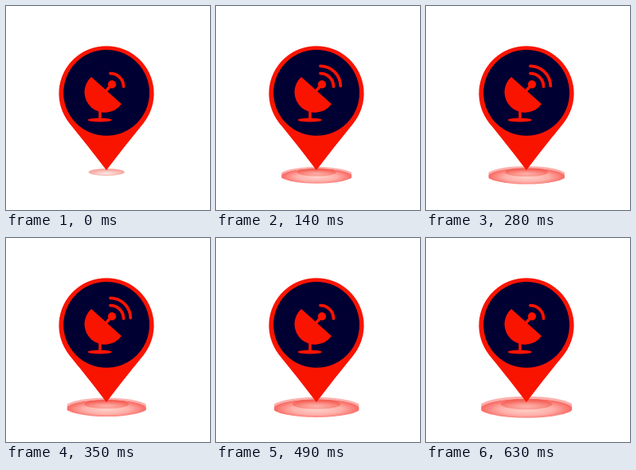
Animation, 256 px wide and 256 px high, one loop 700 ms. Source, as an HTML page:

```html
<!DOCTYPE html>
<html lang="en">
<head>
<meta charset="utf-8">
<title>Signal pin</title>
<style>
  html, body { margin: 0; width: 100%; height: 100%; overflow: hidden; background: #fff; }
  svg { display: block; width: 100vw; height: 100vh; }
</style>
</head>
<body>
<svg viewBox="0 0 256 256">
  <defs>
    <radialGradient id="outerFill" cy=".6">
      <stop offset="0" stop-color="#ffd2cc"/>
      <stop offset=".55" stop-color="#ffb0aa"/>
      <stop offset=".95" stop-color="#f96a64"/>
      <stop offset="1" stop-color="#fbb0ac"/>
    </radialGradient>
    <radialGradient id="innerFill" cy=".65">
      <stop offset="0" stop-color="#f04838" stop-opacity=".12"/>
      <stop offset="1" stop-color="#f04838" stop-opacity=".48"/>
    </radialGradient>
    <clipPath id="sides"><path d="M-1-1H1V1H-1z"/></clipPath>
  </defs>
  <g id="outer"><ellipse rx="1.05" ry=".237" fill="url(#outerFill)" clip-path="url(#sides)"/></g>
  <g id="inner"><ellipse rx="1" ry=".203" fill="url(#innerFill)"/></g>
  <g fill="#f91400">
    <path d="M126 206Q103.3 176 79.2 146.7A59.6 59.6 0 1 1 172.8 146.7Q148.7 176 126 206Z"/>
    <circle cx="126.1" cy="108.9" r="53.9" fill="#000032"/>
    <path d="M107 89A25.65 25.65 0 1 0 145 123Z"/>
    <circle cx="133" cy="98.3" r="5.1"/>
    <path d="M116.2 130h3.6v12h-3.6z"/>
    <ellipse cx="117.7" cy="143.1" rx="15" ry="2.5"/>
  </g>
  <g fill="none" stroke="#f91400" stroke-width="3.8" stroke-linecap="round">
    <path d="M125 107L133 98.3"/>
    <path d="M131 84.6A16.5 16.5 0 0 1 147.5 101"/>
    <path id="wave" d="M131 75.3A25.5 25.5 0 0 1 156.3 100.3"/>
  </g>
</svg>
<script>
  const STEP = 70, STEPS = 10;
  const [outer, inner, wave] = ['outer', 'inner', 'wave'].map(id => document.getElementById(id));

  function place(el, y, radius) {
    el.setAttribute('transform', `translate(126.2 ${y}) scale(${radius})`);
  }

  function show(el, on) {
    el.setAttribute('visibility', on ? 'visible' : 'hidden');
  }

  function draw(now) {
    const step = Math.floor(now / STEP) % STEPS;
    place(outer, 212.3, 40.3 + 1.85 * step);
    place(inner, 208.6, 22.5 + 1.1 * step);
    show(outer, step >= 2);
    show(wave, step >= 2 && step <= 6);
    requestAnimationFrame(draw);
  }
  draw(0);
</script>
</body>
</html>
```
